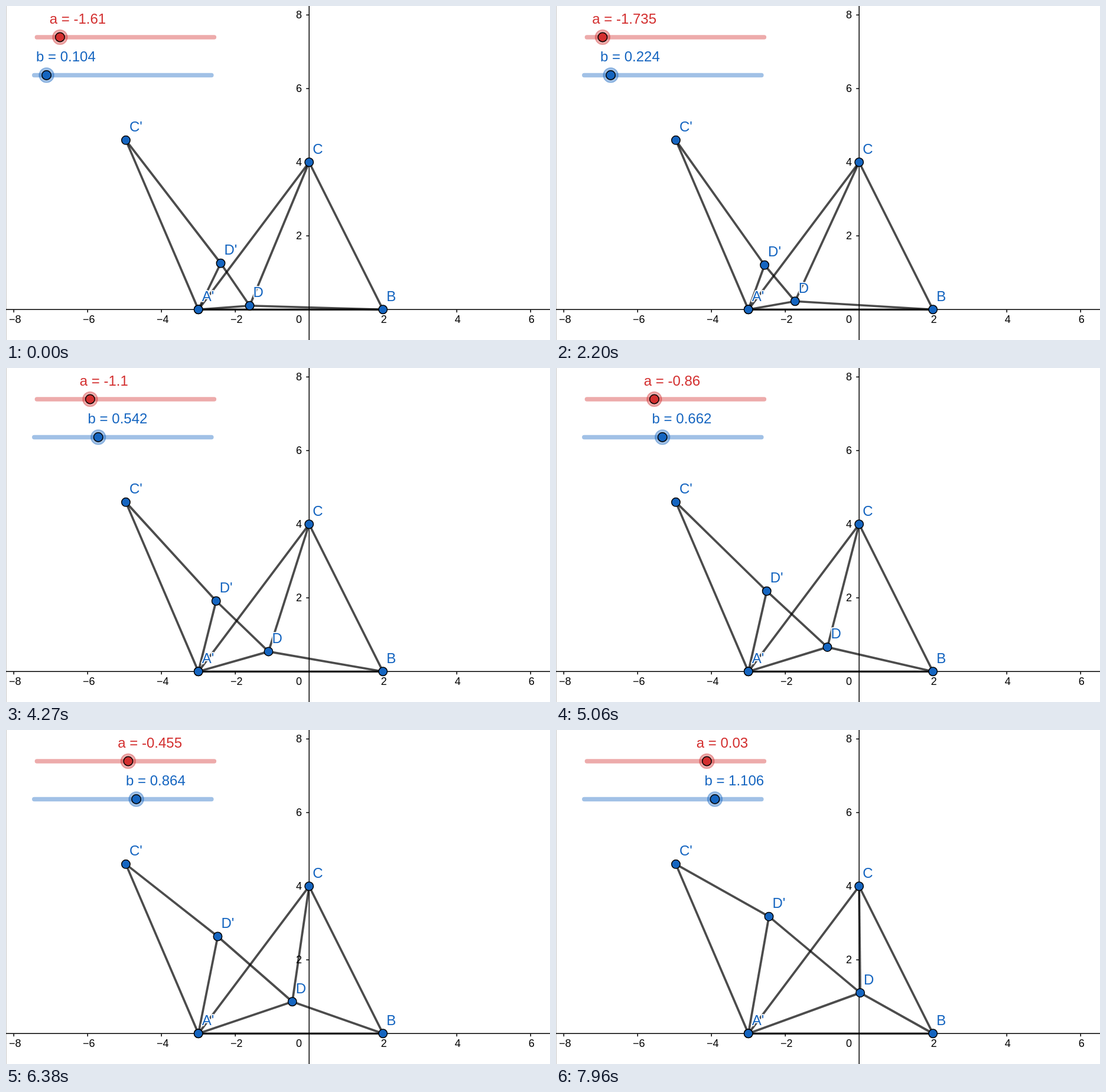
These frames come from a looping animation (921 by 567 pixels, 7990 ms). An HTML page with a canvas:

```html
<!DOCTYPE html>
<html lang="en">
<head>
<meta charset="utf-8">
<title>Rotated triangle</title>
<style>
  html, body { margin: 0; width: 100%; height: 100%; overflow: hidden; background: #fff; }
  canvas { display: block; }
</style>
</head>
<body>
<canvas id="stage" width="921" height="567"></canvas>
<script>
const ctx = document.getElementById('stage').getContext('2d');
const LOOP = 7990;
const BLUE = '#1565c0', RED = '#d32f2f';
const FONT = '"Liberation Sans", Arial, sans-serif';
const ORIGIN = { x: 513.2, y: 515.25 }, UNIT = 62.5;

// Both sliders run at constant speed and bounce off their lower ends;
// everything pauses briefly when slider a turns round.
const PAUSE = { at: 1280, length: 58 };
const A_TURN = 1278, A_SPEED = 0.0003067;
const B_TURN = 678, B_SPEED = 0.0001531;

const snap = (v, step) => +(Math.round(v / step) * step).toFixed(3);

function sliderValues(time) {
  const t = time < PAUSE.at ? time : Math.max(PAUSE.at, time - PAUSE.length);
  return {
    a: snap(-2 + Math.abs(t - A_TURN) * A_SPEED, 0.005),
    b: snap(Math.abs(t - B_TURN) * B_SPEED, 0.002)
  };
}

const toPx = (x, y) => ({ x: ORIGIN.x + x * UNIT, y: ORIGIN.y - y * UNIT });

// Turn by 60 degrees about A = (-3, 0)
function turned(x, y) {
  const c = 0.5, s = Math.sqrt(3) / 2, dx = x + 3;
  return toPx(-3 + c * dx - s * y, s * dx + c * y);
}

function line(p, q, width, color, cap = 'butt') {
  ctx.beginPath();
  ctx.moveTo(p.x, p.y);
  ctx.lineTo(q.x, q.y);
  ctx.lineWidth = width;
  ctx.strokeStyle = color;
  ctx.lineCap = cap;
  ctx.stroke();
}

function disc(x, y, r, fill, stroke, width) {
  ctx.beginPath();
  ctx.arc(x, y, r, 0, Math.PI * 2);
  ctx.fillStyle = fill;
  ctx.fill();
  ctx.lineWidth = width;
  ctx.strokeStyle = stroke;
  ctx.stroke();
}

function text(str, x, y, size, color, align = 'left') {
  ctx.font = `${size}px ${FONT}`;
  ctx.textAlign = align;
  ctx.fillStyle = color;
  ctx.fillText(str, x, y);
}

function axes() {
  const { x, y } = ORIGIN;
  const stroke = (x1, y1, x2, y2) => line({ x: x1, y: y1 }, { x: x2, y: y2 }, 1.5, '#000');
  stroke(0, y, 921, y);
  stroke(x, 0, x, 567);
  text('0', 501, 538, 18, '#000', 'right');

  for (let n = 2; n <= 8; n += 2) {
    const right = x + n * UNIT, left = x - n * UNIT, up = y - n * UNIT;
    stroke(right, y, right, y + 5);
    stroke(left, y, left, y + 5);
    stroke(x - 5, up, x, up);
    text(n, right + 1.5, 538, 18, '#000', 'center');
    text('\u2212' + n, left + 2, 538, 18, '#000', 'center');
    text(n, 501, up + 6, 18, '#000', 'right');
  }
}

function pointLabel(name, p) {
  const x = p.x + 6, y = p.y - 14.5;
  ctx.font = `24px ${FONT}`;
  ctx.textAlign = 'left';
  ctx.lineWidth = 3.6;
  ctx.lineJoin = 'round';
  ctx.strokeStyle = '#fff';
  ctx.strokeText(name, x, y);
  text(name, x, y, 24, BLUE);
}

function slider(name, value, offset, left, y, color) {
  const x = left + offset;
  line({ x: left, y }, { x: left + 300, y }, 7.5, color + '66', 'round');
  disc(x, y, 12.4, color + '66', color + '66', 1.5);
  disc(x, y, 7.75, color, '#000', 1.5);
  text(`${name} = ${value}`, x - 17.6, y - 23, 24, color);
}

function draw(time) {
  const { a, b } = sliderValues(time);

  ctx.fillStyle = '#fff';
  ctx.fillRect(0, 0, 921, 567);
  ctx.fillStyle = '#c8c8c8';
  ctx.fillRect(0, 0, 1, 567);
  axes();

  const A = toPx(-3, 0), B = toPx(2, 0), C = toPx(0, 4), D = toPx(a, b);
  const C2 = turned(0, 4), D2 = turned(a, b);
  const segments = [[A, B], [B, C], [C, A], [A, D], [D, B], [D, C], [A, C2], [C2, D2], [A, D2], [D, D2]];
  for (const [p, q] of segments) line(p, q, 3.75, 'rgba(0,0,0,0.7)');

  const points = { "A'": A, B, C, D, "C'": C2, "D'": D2 };
  for (const name in points) pointLabel(name, points[name]);
  // A and its image coincide, so that disc is drawn twice
  for (const p of [A, ...Object.values(points)]) disc(p.x, p.y, 7.25, BLUE, '#000', 1.5);

  slider('a', a, (a + 2) * 100, 52.4, 52.9, RED);
  slider('b', b, b * 200, 47.8, 117.4, BLUE);
}

const start = performance.now();
function tick() {
  draw((performance.now() - start) % LOOP);
  requestAnimationFrame(tick);
}
tick();
</script>
</body>
</html>
```
